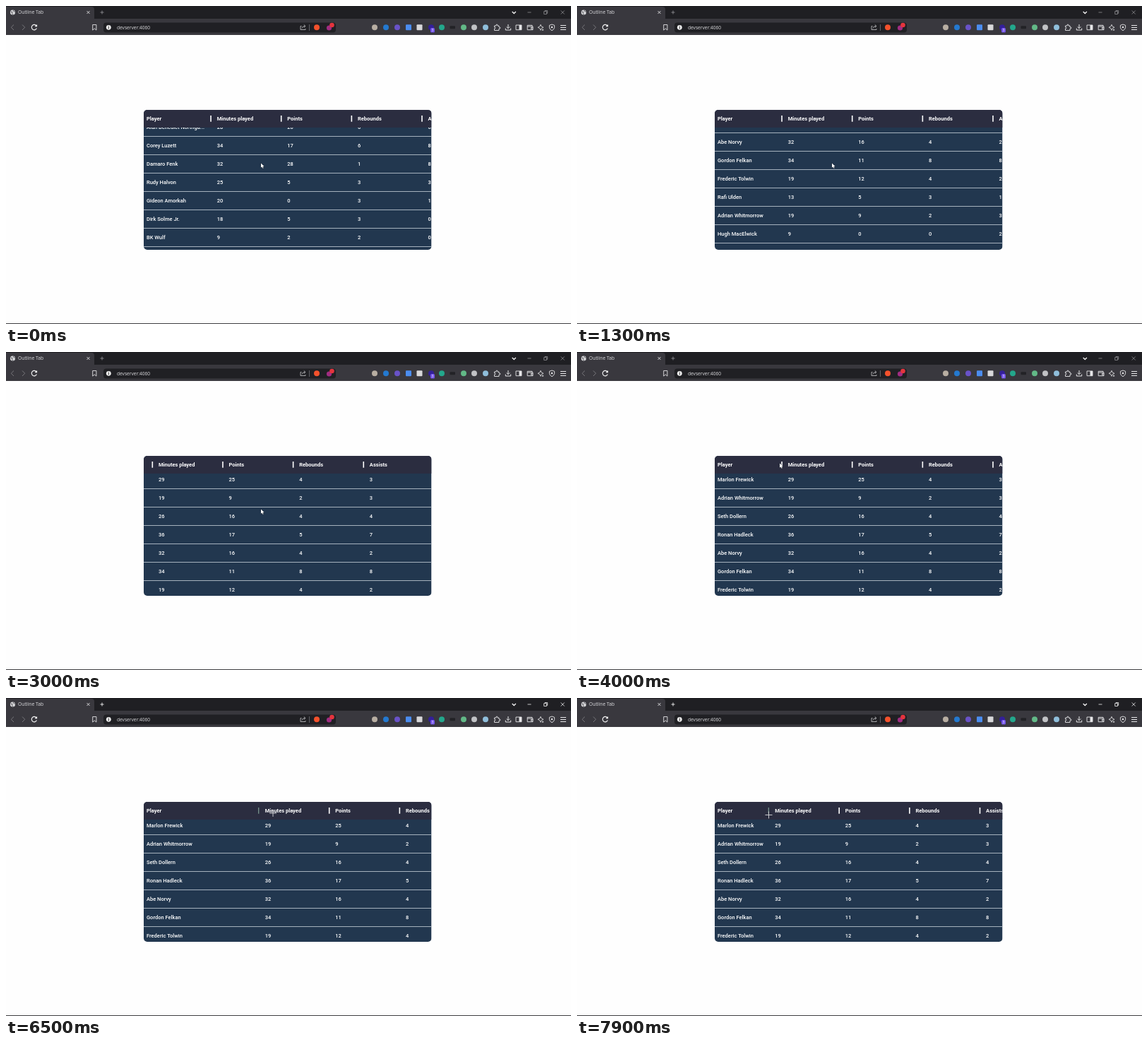
These frames come from a looping animation (800x450 px, 8 s). An HTML page with a canvas:

```html
<!DOCTYPE html>
<html lang="en">
<head>
<meta charset="utf-8">
<title>Player table</title>
<style>
html, body { margin: 0; width: 100%; height: 100%; overflow: hidden; background: #fefefe; }
canvas { display: block; width: 800px; height: 450px; }
</style>
</head>
<body>
<canvas></canvas>
<script>
const canvas = document.querySelector('canvas');
const c = canvas.getContext('2d');
const dpr = window.devicePixelRatio || 1;
canvas.width = 800 * dpr;
canvas.height = 450 * dpr;

const LOOP = 8000;
const TABLE = { x: 195, y: 147, w: 407.5, h: 198, head: 25, col: 99.65, row: 26 };
const FONT = 'Roboto, "Liberation Sans", sans-serif';
const UI = '"Open Sans", "Noto Sans", sans-serif';
const HEADS = ['Player', 'Minutes played', 'Points', 'Rebounds', 'Assists'];
const ROWS = `Marlon Frewick,29,25,4,3
Adrian Whitmorrow,19,9,2,3
Seth Dollern,26,16,4,4
Ronan Hadleck,36,17,5,7
Abe Norvy,32,16,4,2
Gordon Felkan,34,11,8,8
Frederic Tolwin,19,12,4,2
Rafi Ulden,13,5,3,1
Adrian Whitmorrow,19,9,2,3
Hugh MacElwick,9,0,0,2
Tobias Grenholt,8,0,1,0
Elias Thornby,39,23,6,3
Clayton Wesker,35,24,9,2
Alan Benedict Northga...,28,20,6,6
Corey Luzett,34,17,6,8
Damaro Fenk,32,28,1,8
Rudy Halvon,25,5,3,3
Gideon Amorkah,20,0,3,1
Dirk Solme Jr.,18,5,3,0
BK Wulf,9,2,2,0`.split('\n').map(r => r.split(','));

// Keyframes are [time, value] pairs.
const SCROLL_Y = [[0, -154], [900, 23], [1770, 193]];
const SCROLL_X = [[1850, 0], [2100, 26], [2750, 91], [2950, 91], [3500, 0]];
const WIDEN = [[5850, 0], [6500, 68], [6850, 95], [7050, 95], [7900, -18.5]];
const MOUSE_X = [[3500, 361], [3900, 287], [4000, 287], [4300, 290.5], [5750, 290.5],
  [6500, 378], [6850, 390], [7050, 386], [7900, 271.5]];
const MOUSE_Y = [[3500, 223], [3900, 158], [5750, 158], [6500, 163], [7900, 165.5]];
const HOVER = [[500, 0], [900, 1], [1300, 0]];

function at(keys, t) {
  const i = keys.findIndex(k => k[0] > t);
  if (i === 0) return keys[0][1];
  if (i < 0) return keys[keys.length - 1][1];
  const [t0, a] = keys[i - 1], [t1, b] = keys[i];
  return a + (b - a) * (t - t0) / (t1 - t0);
}

function rect(x, y, w, h, color, r = 0) {
  c.fillStyle = color;
  c.beginPath();
  c.roundRect(x, y, w, h, r);
  c.fill();
}

function dot(x, y, r, color) {
  c.fillStyle = color;
  c.beginPath();
  c.arc(x, y, r, 0, 7);
  c.fill();
}

function stroke(path, color = '#e4e4e6', width = 0.9) {
  c.strokeStyle = color;
  c.lineWidth = width;
  c.stroke(new Path2D(path));
}

function text(s, x, y, font, color = '#fff') {
  c.font = font;
  c.fillStyle = color;
  c.fillText(s, x, y);
}

function drawTabs(focused) {
  const ink = focused ? '#f2f2f3' : '#8d8d91';
  rect(0, 0, 800, 20, '#1f1f23');
  rect(0, 1, 125, 19, '#39383e', [0, 4, 0, 0]);
  rect(0, 18, 800, 23, '#39383e');
  dot(9.5, 9, 3.6, '#d5d5d8');
  stroke('M6.5 8L9 8.5L8.5 10.5L10 12M10 5.7L11 7.5L12.7 8.2', '#55555a', 1);
  text('Outline Tab', 17, 11.4, '6.8px ' + UI, '#dcdcdf');
  stroke('M114.5 7L118.5 11M118.5 7L114.5 11', '#e0e0e2');
  stroke('M133.5 9H138.5M136 6.5V11.5', ink);
  stroke('M716.7 8L719.3 10.5L721.9 8', '#f5f5f5', 1.3);
  stroke('M738.5 9H743.5', ink, 0.8);
  stroke('M761.7 7.7h3.8v3.8h-3.8zM763 7.5V6.5H766.7V10.3H765.7', ink, 0.8);
  stroke('M785.7 6.5L790.7 11.5M790.7 6.5L785.7 11.5', ink, 0.8);
}

function drawToolbar() {
  stroke('M11 26.5L7.3 30.2L11 34', '#77777b', 1);
  stroke('M23 26.5L26.7 30.2L23 34', '#77777b', 1);
  stroke('M43 28A3.7 3.7 0 1 0 43.4 31.5M43.5 26.5V28.7H41.2', '#f0f0f1', 1.2);
  stroke('M122.7 26.5h5.2v7.6l-2.6-2.2l-2.6 2.2z');
  rect(138, 23.5, 329, 14, '#202024', 4);
  dot(145.3, 30.3, 3.4, '#f0f0f0');
  rect(144.8, 29.8, 1, 2.4, '#222');
  rect(144.8, 28.2, 1, 1, '#222');
  text('devserver:4060', 157, 32.7, '6.6px ' + UI, '#dedee1');
  stroke('M418.5 28.5H417V33.5H424V32M419 31.5Q419.5 28.5 423.5 28.5M421.8 26.5L424 28.5L421.8 30.5', '#c8c8cb', 0.8);
  rect(429, 26, 1, 9, '#606065');
  dot(440, 30.3, 4, '#f4512c');
  dot(457.5, 31, 3.6, '#a02c82');
  dot(461.5, 27, 3.3, '#e5343d');

  [[522, '#b8aea2'], [538, '#2479d0'], [554, '#6952c8'], [602, '#34209a'], [617, '#23a78c'],
    [648, '#62b987'], [663, '#c1c2c5'], [679, '#8fbedb']].forEach(([x, color]) => dot(x, 30.3, 4, color));
  rect(566, 26.3, 8, 8, '#4b8df0', 1);
  rect(581.5, 26.3, 8, 8, '#d8d8da', 1);
  rect(628.5, 28.3, 7.5, 4, '#222226', 1);
  rect(601, 31, 6, 6.5, '#7352e8', 1.5);
  text('3', 602.6, 36.3, '5px ' + UI);

  const ink = '#e7e7e9';
  stroke('M691.5 28H694Q693.7 26 695 26Q696.3 26 696 28H698V30Q700 29.7 700 31Q700 32.3 698 32V34.5H691.5V32Q693 32 693 31Q693 30 691.5 30z', ink);
  stroke('M711 26V31.5M708.7 29.4L711 31.7L713.3 29.4M707.3 31.5V34H714.7V31.5', ink, 1);
  stroke('M722 27h8v6.7h-8z', ink);
  rect(726.5, 27, 3.5, 6.7, ink);
  stroke('M738.2 27.3H745V29M738.2 27.3V33.7H746V29H738.2M746 30.5H743.5V32.3H746', ink);
  stroke('M757 26.3Q757.5 29.7 761 30.3Q757.5 30.8 757 34.3Q756.5 30.8 753 30.3Q756.5 29.7 757 26.3M760 32.5V35M758.8 33.8H761.2', ink, 0.8);
  stroke('M773 26L776.6 27.3V30.5Q776.3 33 773 34.8Q769.7 33 769.4 30.5V27.3z', ink);
  dot(773, 30, 1.3, ink);
  stroke('M785 27.5H793M785 30.5H793M785 33.5H793', ink, 1);
}

function drawTable(t) {
  const { x, y, w, h, head, col, row } = TABLE;
  const shift = at(SCROLL_X, t), widen = at(WIDEN, t);
  const firstLine = Math.round(at(SCROLL_Y, t));
  const mouseY = at(MOUSE_Y, t), hover = at(HOVER, t);
  const cellX = i => x + 4 + i * col - shift + (i ? widen : 0);

  c.save();
  c.beginPath();
  c.roundRect(x, y, w, h, 5);
  c.clip();
  rect(x, y, w, h, '#22374f');
  ROWS.forEach((cells, i) => {
    const line = firstLine + i * row;
    if (line < y || line > y + h + row) return;
    const hot = mouseY < line && mouseY >= line - row ? hover : 0;
    if (hot) rect(x, line - row + 1, w, row - 1, `rgba(36,46,62,${0.65 * hot})`);
    rect(x, line, w, 1, '#a5b1bd');
    c.globalAlpha = 1 - 0.2 * hot;
    cells.forEach((s, j) => text(s, cellX(j), line - 9.8, '500 7.5px ' + FONT));
    c.globalAlpha = 1;
  });
  rect(x, y, w, head, '#2b2d40');
  HEADS.forEach((s, i) => {
    text(s, cellX(i), y + 14.7, 'bold 7.5px ' + FONT);
    const dragged = i === 0 && t >= 5900;
    rect(cellX(i + 1) - 9.4, y + 8, dragged ? 1 : 1.6, 8.7, dragged ? '#8fb5a5' : '#fff');
  });
  c.restore();
}

function drawPointer(t) {
  const x = at(MOUSE_X, t), y = at(MOUSE_Y, t);
  if (t >= 4200) {
    stroke(`M${x - 5} ${y}h10M${x} ${y - 5}v10`, '#d8d8dc', 0.9);
    return;
  }
  const arrow = new Path2D(`M${x} ${y - 0.5}v6.3l1.5-1.3l1.1 2.3l1-.5l-1-2.2h2z`);
  c.strokeStyle = '#151c28';
  c.lineWidth = 0.8;
  c.stroke(arrow);
  c.fillStyle = '#fff';
  c.fill(arrow);
}

function draw(now) {
  const t = Math.floor(now % LOOP / 100) * 100;
  c.setTransform(dpr, 0, 0, dpr, 0, 0);
  rect(0, 0, 800, 450, '#fefefe');
  drawTabs(t >= 4300);
  drawToolbar();
  drawTable(t);
  drawPointer(t);
  rect(0, 449, 800, 1, '#3c3c40');
  requestAnimationFrame(draw);
}
draw(0);
</script>
</body>
</html>
```
